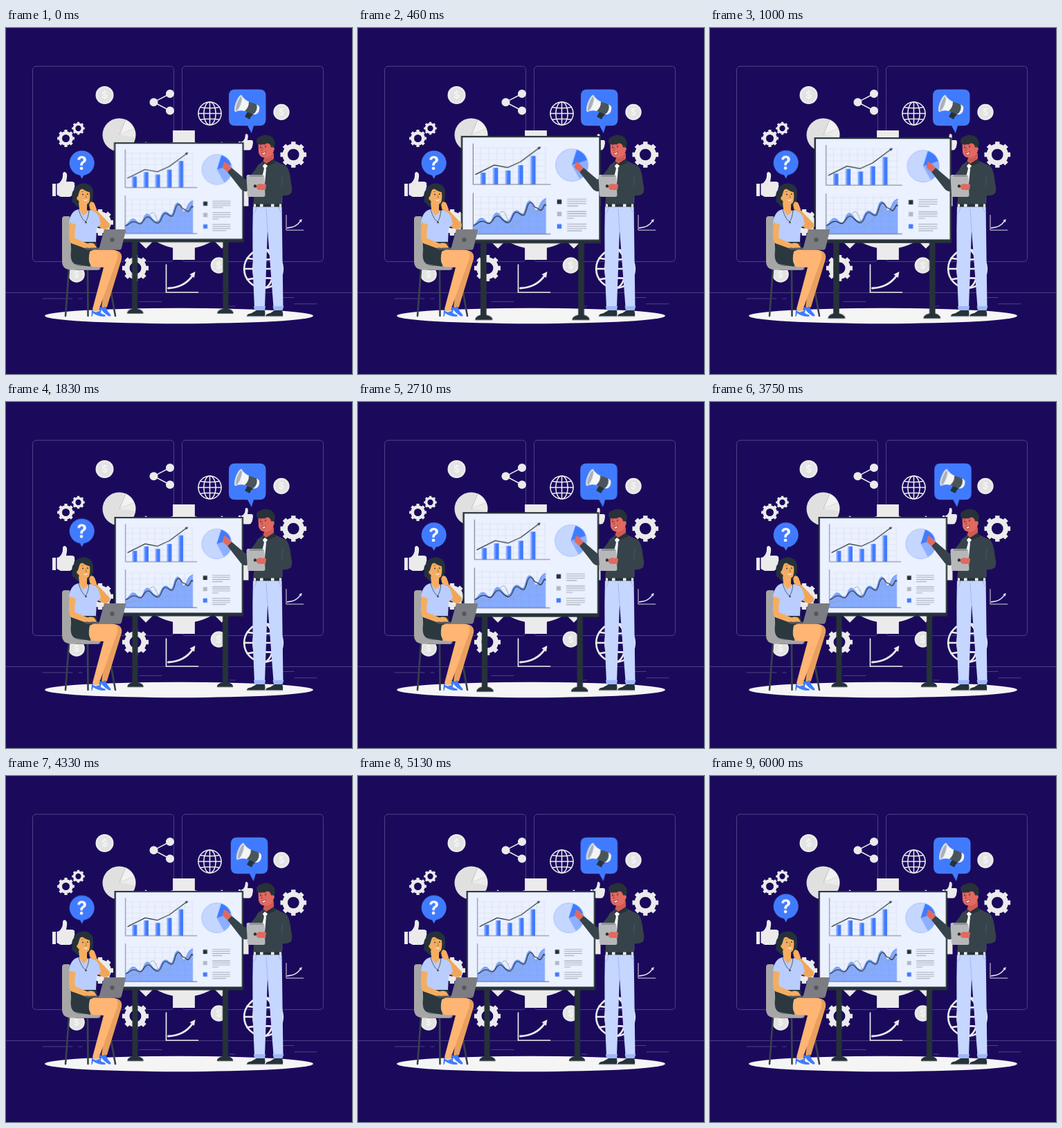
These frames come from a looping animation (500 by 500 pixels, 6.04 s). An HTML page:

```html
<!DOCTYPE html>
<html lang="en">
<head>
<meta charset="utf-8">
<title>Presentation</title>
<style>
html, body { margin: 0; width: 100%; height: 100%; overflow: hidden; background: #1b0a5c; }
svg { display: block; width: 100vw; height: 100vh; }
text { font-family: Inter, "Open Sans", sans-serif; text-anchor: middle; }
.line { fill: none; stroke-linecap: round; stroke-linejoin: round; }
#board, #idea, #ask { animation: 6040ms linear infinite; }
#board { transform-origin: 249.8px 289px; animation-name: beat; }
#ask { animation-name: float; }
#idea { animation-name: shake; }

@keyframes beat {
  0% { transform: scale(1.0058); }
  9.4%, 49.34% { transform: scale(1.1); }
  29.37%, 39.35%, 59.32%, 100% { transform: scale(1); }
}
@keyframes float {
  0%, 16.06%, 41.02%, 65.98%, 90.93% { transform: translateY(0); }
  28.54%, 53.49%, 78.46% { transform: translateY(-10px); }
  100% { transform: translateY(-7.27px); }
}
@keyframes shake {
  0%, 41.02%, 90.94% { transform: translateX(0); }
  46.01%, 85.95%, 95.93% { transform: translateX(-1px); }
  51%, 80.96% { transform: translateX(2px); }
  56%, 65.98%, 75.96% { transform: translateX(-4px); }
  60.99%, 70.97% { transform: translateX(4px); }
  100% { transform: translateX(1.45px); }
}
</style>
</head>
<body>
<svg viewBox="0 0 500 500">
<defs>
  <path id="teeth" d="M0-10V-7.5M0 10V7.5M-10 0H-7.5M10 0H7.5" stroke-width="3.4"/>
  <g id="gear" fill="none" stroke="#ebebeb">
    <circle r="6.4" stroke-width="3.9"/>
    <use href="#teeth"/><use href="#teeth" transform="rotate(45)"/>
  </g>
  <g id="globe" class="line" stroke="#ebebeb" stroke-width=".9">
    <circle r="9.5"/><ellipse rx="5" ry="9.5"/>
    <path d="M0-9.5V9.5M-9.5 0H9.5M-8-5.2Q0-3.8 8-5.2M-8 5.2Q0 3.8 8 5.2"/>
  </g>
  <g id="coin">
    <circle r="13" fill="#ebebeb"/><circle r="10.4" fill="#e3e3e3"/>
    <text y="5" font-size="14" font-weight="600" fill="#f5f5f5">$</text>
  </g>
  <g id="thumb" fill="#ebebeb">
    <path d="M0 17h5v18H0zM6.5 17L10 16Q15 11 15 5Q14.500 0 18 0Q22 1 21 8L20 14H29Q33 15 32 18Q33 21 31.500 23Q32 26 30.500 28Q31 31 29 32Q28 36 24 36H12L6.500 33z"/>
  </g>
  <g id="growth" class="line" stroke="#ebebeb">
    <path stroke-width="1.700" d="M0 0V40H46"/>
    <path stroke-width="3" d="M3 34Q26 33 38 16"/>
    <path fill="#ebebeb" stroke="none" d="M42 10L40.500 19L34 14z"/>
  </g>
  <g id="note" class="line" stroke="#a4a9b5" stroke-width="1"><path d="M0 0H25M0 3H25M0 6H25"/></g>
  <pattern id="grid" width="10.8" height="8.2" x="172.500" y="181" patternUnits="userSpaceOnUse">
    <path d="M10.300 0V8.200M0 .5H10.800" fill="none" stroke="#d8ddea" stroke-width=".6"/>
  </pattern>
  <linearGradient id="bar"><stop offset=".25" stop-color="#7da4ff"/><stop offset=".4" stop-color="#407bff"/></linearGradient>
  <path id="wave" d="M173 285C178 283 179 276 184 276S189 282 194 282S199 269 204 269S212 280 218 280S224 266 230 266S235 271 239 270S243 253 248 253S253 266 257 266S262 250 270 250"/>
</defs>

<rect width="500" height="500" fill="#1b0a5c"/>
<g class="line" stroke="#53478a" stroke-width=".9">
  <rect x="38.500" y="55.300" width="204" height="282.300" rx="5"/>
  <rect x="254.500" y="55.300" width="204" height="282.300" rx="5"/>
  <path d="M0 382.500H500M53 391H96M105 391H110M193 395.500H225M323 402H331M388 389.500H416M417 398.700H449"/>
</g>

<g id="icons">
  <use href="#coin" x="142.500" y="97"/>
  <use href="#coin" transform="translate(398 121.500) scale(.9)"/>
  <use href="#coin" transform="translate(307.500 343) scale(.91)"/>
  <use href="#coin" transform="translate(102 356) scale(.91)"/>
  <g fill="#ebebeb" stroke="#ebebeb" stroke-width="1.500">
    <path d="M237 95L213.500 107.200L237 119.500" fill="none"/>
    <circle cx="237" cy="95" r="5.300"/><circle cx="213.500" cy="107.200" r="5.300"/><circle cx="237" cy="119.500" r="5.300"/>
  </g>
  <use href="#globe" transform="translate(294.500 123.500) scale(1.740)"/>
  <use href="#globe" transform="translate(372 348) scale(2.930)"/>
  <use href="#gear" transform="translate(86.500 159.500) scale(1.240)"/>
  <use href="#gear" transform="translate(104.500 145) scale(.93)"/>
  <use href="#gear" transform="translate(415.300 183) scale(1.880)"/>
  <use href="#gear" transform="translate(187 347) scale(1.900)"/>
  <use href="#gear" transform="translate(136 281) scale(1.900)"/>
  <use href="#gear" transform="translate(257 241.500) scale(9.350)"/>
  <use href="#thumb" x="67" y="208"/>
  <use href="#thumb" transform="translate(336 153) scale(.65)"/>
  <circle cx="163.500" cy="154.500" r="24" fill="#e0e0e0"/>
  <path d="M164 154L173 132.400A24 24 0 0 1 185.500 145.500z" fill="#f2f2f2" stroke="#8d8d99" stroke-width=".4"/>
  <path d="M164 154L185.500 145.500A24 24 0 0 1 187 158z" fill="#ebebeb"/>
  <use href="#growth" x="231.500" y="342"/>
  <use href="#growth" transform="translate(405 270.500) scale(.54)"/>
</g>

<ellipse cx="250" cy="416" rx="194" ry="11.200" fill="#f5f5f5"/>

<g id="board">
  <path fill="#263238" d="M182.500 306h8v99q6 1 8 5v2h-23v-2q2-4 7-5zM313 306h8v99q5 1 7 5v2h-23v-2q2-4 8-5z"/>
  <rect x="156.500" y="166" width="186.600" height="143.500" fill="#263238"/>
  <rect x="158.800" y="168" width="182" height="136.500" fill="#ebf1ff"/>
  <rect x="173" y="181" width="97.500" height="49" fill="url(#grid)"/>
  <rect x="173" y="246.600" width="97.500" height="50" fill="url(#grid)"/>
  <g fill="url(#bar)">
    <rect x="182.500" y="215.200" width="6.800" height="15.600"/>
    <rect x="199.200" y="208.700" width="6.800" height="22"/>
    <rect x="215.900" y="212.200" width="6.800" height="18.500"/>
    <rect x="232.600" y="205.200" width="6.800" height="25.500"/>
    <rect x="249.300" y="192.700" width="6.800" height="38"/>
  </g>
  <use href="#wave" fill="#407bff" fill-opacity="0"/>
  <path fill="#407bff" fill-opacity=".58" d="M173 297V285C178 283 179 276 184 276S189 282 194 282S199 269 204 269S212 280 218 280S224 266 230 266S235 271 239 270S243 253 248 253S253 266 257 266S262 250 270 250V297z"/>
  <g class="line">
    <path stroke="#99a2b3" stroke-width=".9" d="M173 291C182 290 187 285 193 286S206 267 212 267S219 287 225 285S237 278 241 270S247 264 251 267S259 271 262 262S267 264 270 257"/>
    <use href="#wave" stroke="#407bff" stroke-width=".8"/>
    <path stroke="#263238" stroke-width="1.200" d="M173 286C178 284 180 280 185 280S190 283 194 283S200 273 205 273S213 282 219 282S225 268 230 268S236 273 240 272S244 255 249 255S253 262 257 262S262 270 266 262S268 259 270 259"/>
    <path stroke="#777e8c" stroke-width="1" d="M172.700 176.500V230.800H275.800M172.700 242.500V297H275.800"/>
    <path stroke="#263238" stroke-width="1.100" d="M176 217.500L201 205L219 208.300L236 200.500L261 182"/>
  </g>
  <path d="M263 180.500L258.700 181.200L261.200 184.500z" fill="#263238"/>
  <circle cx="304.500" cy="205" r="21.800" fill="#c5d6ff"/>
  <path d="M304.500 205L324.800 197A21.800 21.800 0 0 1 315 224z" fill="#8cafff"/>
  <path d="M304.500 205L311 184.200A21.800 21.800 0 0 1 325.200 198z" fill="#407bff"/>
  <circle cx="304.500" cy="205" r="21.600" fill="none" stroke="#8cafff" stroke-width=".5"/>
  <rect x="284.800" y="251" width="6" height="6" fill="#263238"/>
  <rect x="284.800" y="267.300" width="6" height="6" fill="#b4b8c0"/>
  <rect x="284.800" y="283.800" width="6" height="6" fill="#407bff"/>
  <use href="#note" x="298.500" y="250.500"/><use href="#note" x="298.500" y="267"/><use href="#note" x="298.500" y="283.700"/>
  <path class="line" stroke="#a4a9b5" d="M298.500 259.500h14M298.500 276h8M298.500 292.700h19"/>
</g>

<g id="woman">
  <path class="line" stroke="#37434a" stroke-width="2.600" d="M91 349L86 416M118 349L118.500 416M146 349L158 416"/>
  <path fill="#77787c" d="M90 272Q94 272 94 276L98 330Q99 341 110 342H132Q137 342 137 346T132 350H100z"/>
  <path fill="#a6a6a6" d="M81 276Q81 272 85 272H90Q92 272 92 276L95 332Q96 343 107 344H132Q137 345 135 348Q134 349.500 131 349.500H92Q81 348 81 338z"/>
  <path fill="#263238" d="M111 224.500Q121 224 125 232Q127 238 125 250Q121 259 114 259Q103 261 99 254Q94 252 96 245Q94 239 98 234Q101 225.500 111 224.500z"/>
  <path fill="#e9a05e" d="M130 321H157Q169 323 167 334L146 403Q142 406 138 403L147 345z"/>
  <path fill="#ffb573" d="M120 320H150Q164 320 161 333L134 408Q129 412 125 406L141 346L124 345Q116 336 120 320z"/>
  <path fill="#407bff" d="M124 406.500Q127 411 131 410.500L134 409Q138 413.500 143 414.500Q145 417 142 417Q132 417 126 412L124.500 417H123.300zM135 402Q139 406 143.500 402Q146 409 151 414Q152.500 417 149 416.500Q142 413 138 407L136 414H135z"/>
  <path fill="#2b383e" d="M96 306L130 306L132 318L121 323Q118 336 122 345L100 341Q92 338 94 322z"/>
  <path fill="#f5ad62" d="M105 252L117 252V263L123 266L112 276L100 265L106 262z"/>
  <path fill="#b9cdff" d="M105 262L112 271L121 263Q130 265 132 270L136 278L131 289L130 309H97L98 291L91 282Q93 264 105 262z"/>
  <path fill="#f5ad62" d="M92 281L101 284Q98 298 100 304L119 312Q127 309 129 314L132 319L116 319L94 311Q89 306 92 281z"/>
  <path fill="#f0a65a" d="M127 259Q128 253 123 251Q119 253 121 261L133 276L131 286L142 291Q151 291 150 283z"/>
  <path fill="#b9cdff" d="M121 263Q131 265 134 272L137 283L131 289L124 280z"/>
  <path fill="#f5ad62" d="M107 233Q116 231 121 238Q122 246 120 252Q115 258 109 254Q103 251 104 243z"/>
  <path fill="#263238" d="M104 246Q103 235 110 232Q116 237 122 237Q121 227 110 227Q99 230 101 247z"/>
  <circle cx="105" cy="246" r="2.700" fill="#f5ad62"/>
  <circle cx="111" cy="240.500" r=".9" fill="#263238"/><circle cx="118" cy="240" r=".9" fill="#263238"/>
  <path class="line" stroke="#a75c37" stroke-width=".7" d="M115 241L116.500 245H114.500M109 236.500L112 236"/>
  <path fill="#fff" d="M111.500 248Q116 249.500 118.500 247.500Q116 252 111.500 248z"/>
  <path fill="#f5ad62" d="M122 252Q126 250 128 254L131 262L126 266L121 260z"/>
  <path class="line" stroke="#37434a" stroke-width=".8" d="M105 263Q110 278 115 280Q119 275 120 263"/>
  <circle cx="115.500" cy="281" r="1.300" fill="#37434a"/>
  <path fill="#56595f" d="M114 317.500H158L166 320.500H116z"/>
  <path fill="#7c7d82" d="M142 291H171Q173.500 291 173 293L167 318Q166.500 320.500 164 320.500H134z"/>
  <circle cx="153.500" cy="306" r="3.200" fill="#55585e"/>
  <path fill="#f5ad62" d="M115 314Q119 309 126 311L128 316L120 318z"/>
</g>

<g id="man">
  <path fill="#c5d6ff" d="M357 254H398.500L400.500 403H386.500L378 292L374 404H359Q355 330 357 254z"/>
  <path class="line" stroke="#9eb9fa" stroke-width="1" d="M376 262L378 292M362 259Q361 266 358 268M394 259Q396 266 398.500 267"/>
  <path fill="#9eb9fa" d="M358 402H375L374 408H359zM385.500 402H401.500L399.500 408H387z"/>
  <path fill="#263238" d="M362 408H374Q375 413 374 416.500H348Q348 413 354 412.500zM388 408H399Q401 412 400 416.500H375Q375 413 382 412z"/>
  <path class="line" stroke="#8a9297" stroke-width=".8" d="M348 416.800H374M375 416.800H400"/>
  <path fill="#37434a" d="M371 193L387 191L404 199Q410 203 412 224Q415 236 411 240L399 242V256H357L359 236L361 222L348 236Q342 237 338 231L320 208L326 202L346 219Q358 210 364 198z"/>
  <path fill="#263238" d="M357 254.500H399V258.500H357z"/>
  <path fill="#f5f5f5" d="M358 254.500h3v4h-3zM367 254.500h4.500v4h-4.500zM383 254.500h4.500v4h-4.500zM395 254.500h3v4h-3z"/>
  <path fill="#cf5a54" d="M375 181H387V191L376 200L371 194z"/>
  <path fill="#263238" d="M387 189L390 194L378 200L372 198L371 192L376 196z"/>
  <path fill="#fff" d="M374 196L378 199L376 203L374 225L370 229L368 224L373 203L371 199z"/>
  <path fill="#e2695f" d="M364.500 166Q375 160 385 166L387 178Q384 187 376 187.500Q367 188 365 180z"/>
  <path fill="#263238" d="M363 167.500Q360 159 367 157Q374 152.500 382 156Q391 161 388 171L387 178L383 172Q382 167 378 166.500Q370 170 363 167.500z"/>
  <circle cx="385" cy="175" r="2.800" fill="#e2695f"/>
  <circle cx="368" cy="172.500" r=".9" fill="#263238"/><circle cx="375" cy="171.500" r=".9" fill="#263238"/>
  <path class="line" stroke="#a13a3b" stroke-width=".7" d="M370.500 172.500L369 176.500L371 177M366 170L369 169M373 168.500L376 169"/>
  <path fill="#fff" stroke="#7d2930" stroke-width=".7" d="M369.500 180.500Q373 181 375.500 178.500Q375 183.500 371 183z"/>
  <path fill="#e2695f" d="M320 208L313 202Q312 198 315 197L314 194Q318 193 322 198L326 202z"/>
  <path fill="#b7b7ba" d="M350 212H370Q373 212 373.500 215L374.500 241Q374.500 244 372 244H352Q349 244 349 241L347.500 215Q347.500 212 350 212z"/>
  <path fill="#8f9296" d="M352 212H370L371 215H352z"/>
  <circle cx="360" cy="228.500" r="2.300" fill="#263238"/>
  <path fill="#37434a" d="M374 227L399 226L411 239Q407 243 400 242L374 235z"/>
  <path fill="#e2695f" d="M376 226L366 225Q361 227 362 230Q362 234 367 234L375 234z"/>
  <path class="line" stroke="#56626a" stroke-width=".7" d="M400 213Q398 223 399 228M375 203L379 199M399 242V252"/>
</g>

<g id="idea">
  <path fill="#407bff" d="M331 88.800H366.500Q375.500 88.800 375.500 97.800V132.500Q375.500 141.300 366.500 141.300H358L354.800 152L349 141.300H331Q322 141.300 322 132.500V97.800Q322 88.800 331 88.800z"/>
  <path fill="#263238" d="M349 121L358 124L354 128L352 132L345 128z"/>
  <path fill="#f5f5f5" d="M359 109Q368 112 366 118Q365 126 356 125z"/>
  <path fill="#4a555b" d="M349 106L362 110Q365 119 357 125L344 119z"/>
  <path fill="#f5f5f5" d="M340 97Q345 104 351 106.500Q351 115 345 120Q338 118 331 121z"/>
  <ellipse cx="335.800" cy="109" rx="4" ry="13" transform="rotate(20 335.800 109)" fill="#d7dbe4"/>
  <ellipse cx="336.500" cy="109.500" rx="2.400" ry="10.500" transform="rotate(20 336.500 109.500)" fill="#a9b0bc"/>
</g>

<g id="ask">
  <circle cx="109.700" cy="195.200" r="18" fill="#407bff"/>
  <path d="M106 211H113.500L109.700 218z" fill="#407bff"/>
  <text x="109.700" y="205" font-size="26.500" font-weight="700" fill="#fff">?</text>
</g>
</svg>
</body>
</html>
```
